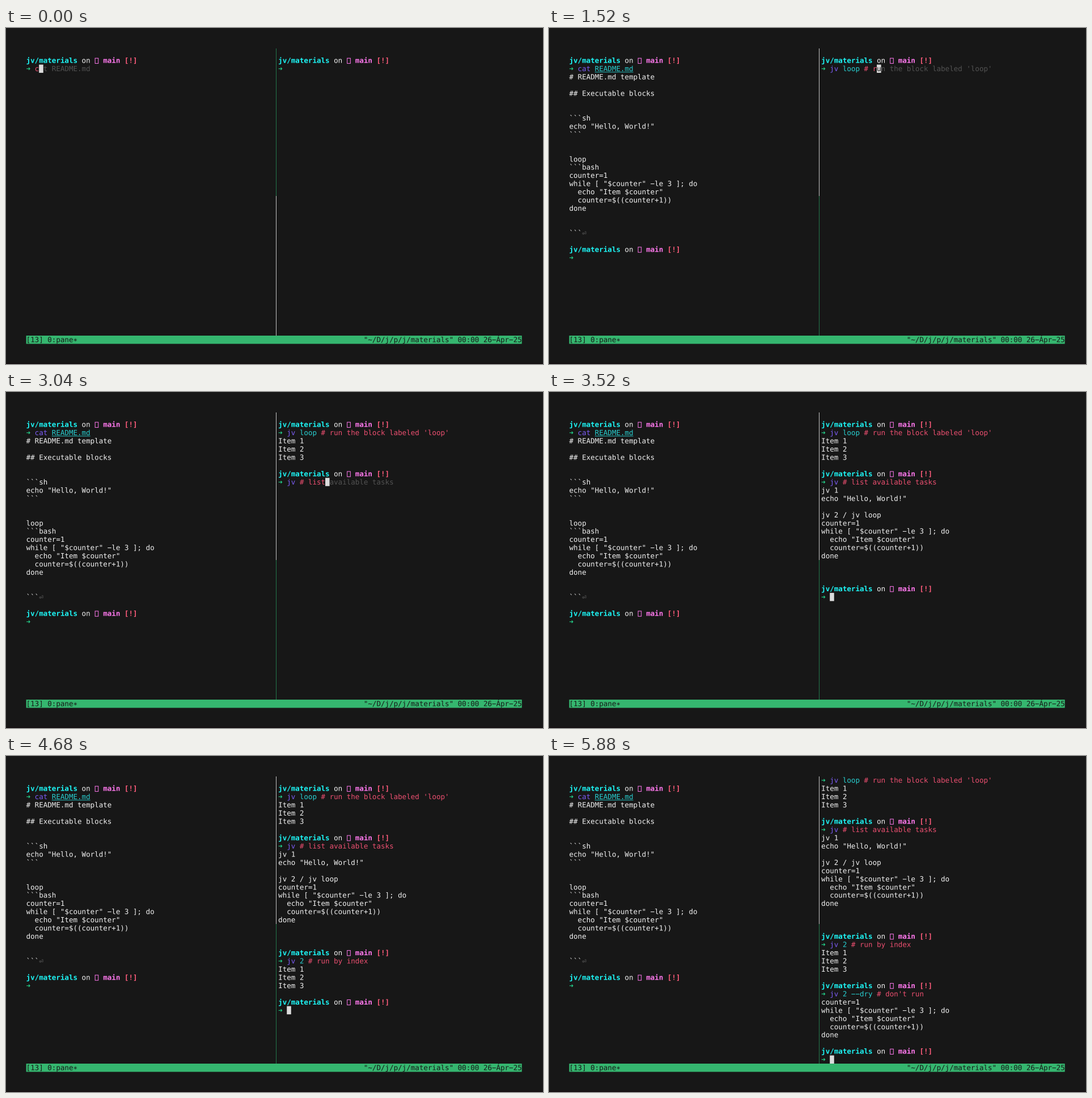
Write an HTML page with a canvas that moves like this. It is 947 by 592 pixels and loops after 7480 ms.

```html
<!DOCTYPE html>
<html lang="en">
<head>
<meta charset="utf-8">
<title>Terminal session</title>
<style>
  html, body { margin: 0; width: 100%; height: 100%; overflow: hidden; background: #171717; }
  canvas { display: block; width: 947px; height: 592px; }
</style>
</head>
<body>
<canvas id="stage" width="1894" height="1184"></canvas>
<script>
const ctx = document.getElementById('stage').getContext('2d');
const LOOP = 7480, COLS = 116, ROWS = 35, SPLIT = 59;
const X0 = 35.6, Y0 = 35.55, CELL_W = 7.535, CELL_H = 14.47;
const FONT = '12.52px "DejaVu Sans Mono", Menlo, monospace';
const BG = '#171717', TEXT = '#f2f2f2', CYAN = '#1df6f6', ARG = '#28cfd0', PINK = '#ff78ee',
  RED = '#ff5c7c', NOTE = '#ec4f70', GREEN = '#24d18a', VIOLET = '#7c5cf5', GHOST = '#525252',
  BLOCK = '#dcdcdc', BAR = '#35b66f', LINE = '#c4c4c4', LINE_ON = '#24774b';
const PWD = '~/D/j/p/j/materials';

const span = (text, color = TEXT, style = {}) => ({ text, color, ...style });
const bold = { bold: true };
const plain = block => block.split('\n').map(s => [span(s)]);
const PROMPT = [span('jv/materials', CYAN, bold), span(' on '), span('▯', PINK),
  span(' main ', PINK, bold), span('[!]', RED, bold)];
const ARROW = span('➜ ', GREEN, bold);

const SCRIPT = `counter=1
while [ "$counter" -le 3 ]; do
  echo "Item $counter"
  counter=$((counter+1))
done`;
const HELLO = 'echo "Hello, World!"';
const ITEMS = 'Item 1\nItem 2\nItem 3';
const README = plain(`# README.md template

## Executable blocks


\`\`\`sh
${HELLO}
\`\`\`


loop
\`\`\`bash
${SCRIPT}


\`\`\``);
README[README.length - 1].push(span('⏎', '#777'));

const leftJobs = [{ at: 0, done: 280, cmd: 'cat README.md', out: README }];
const rightJobs = [
  { at: 1320, done: 2200, cmd: "jv loop # run the block labeled 'loop'", out: plain(ITEMS), quick: true },
  { at: 2880, done: 3520, cmd: 'jv # list available tasks',
    out: plain(`jv 1\n${HELLO}\n\njv 2 / jv loop\n${SCRIPT}\n\n`) },
  { at: 4160, done: 4680, cmd: 'jv 2 # run by index', out: plain(ITEMS) },
  { at: 5320, done: 5880, cmd: "jv 2 --dry # don't run", out: plain(SCRIPT) }
];

// Shell syntax colours for a partly typed command.
function paint(cmd) {
  const [, name, args, note] = cmd.match(/^(\S*)([^#]*)(.*)$/);
  const known = name === 'cat' || name === 'jv';
  const spans = [span(name, known ? VIOLET : NOTE)];
  for (const part of args.split(/(\s+)/))
    spans.push(span(part, ARG, { underline: name === 'cat' && part.trim() !== '' }));
  return [...spans, span(note, NOTE)];
}

// Screen contents of one pane at time t.
function shell(t, jobs) {
  const lines = [[], PROMPT];
  for (const [i, job] of jobs.entries()) {
    if (t < job.at) break;
    if (t < job.done) {
      const count = 1 + 2 * Math.floor((t - job.at) / 40);
      const typed = job.cmd.slice(0, count);
      const past = jobs.slice(0, i).reverse().concat(job);
      const ghost = past.find(p => p.cmd.startsWith(typed)).cmd.slice(typed.length);
      const entered = count > job.cmd.length && !job.quick;
      lines.push([ARROW, ...paint(typed), span(entered ? '' : ghost, GHOST)]);
      return entered
        ? { lines, row: lines.length, col: 0, under: '', title: `${job.cmd.slice(0, 20)} ${PWD}`.slice(0, 21) }
        : { lines, row: lines.length - 1, col: 2 + typed.length, under: jobs === leftJobs ? '' : ghost[0] || '' };
    }
    lines.push([ARROW, ...paint(job.cmd)], ...job.out, [], PROMPT);
  }
  lines.push([ARROW]);
  return { lines, row: lines.length - 1, col: 2, under: '' };
}

function fill(color, x, y, w, h) {
  ctx.fillStyle = color;
  ctx.fillRect(x, y, w, h);
}

// Draws text on the character grid and returns the next column.
function write({ text, color, bold, underline }, col, row) {
  ctx.font = (bold ? 'bold ' : '') + FONT;
  const y = Y0 + row * CELL_H;
  for (const ch of text) {
    const x = X0 + col++ * CELL_W;
    ctx.fillStyle = ctx.strokeStyle = color;
    if (ch === '▯') ctx.strokeRect(x + 1, y + 3.2, 5.6, 9.2);
    else ctx.fillText(ch === '-' ? '−' : ch, x, y + 11.6);
    if (underline) fill(color, x, y + 12.8, CELL_W, 0.9);
  }
  return col;
}

function drawPane(pane, left, focused) {
  const scroll = Math.max(0, pane.lines.length - ROWS);
  pane.lines.slice(scroll).forEach((line, row) =>
    line.reduce((col, part) => write(part, col, row), left));
  if (!focused) return;
  const col = left + pane.col, row = pane.row - scroll;
  fill(BLOCK, X0 + col * CELL_W, Y0 + row * CELL_H, CELL_W, CELL_H);
  write(span(pane.under, BG), col, row);
}

function draw(t) {
  const onLeft = t < 960;
  const left = shell(t, leftJobs), right = shell(t, rightJobs);
  fill(BG, 0, 0, 947, 592);
  fill('#140f11', 0, 590, 947, 2);
  fill(onLeft ? LINE_ON : LINE, 476, 36, 1, 260);
  fill(onLeft ? LINE : LINE_ON, 476, 296, 1, 246);
  drawPane(left, 0, onLeft);
  drawPane(right, SPLIT, !onLeft);
  fill(BAR, X0, Y0 + ROWS * CELL_H, COLS * CELL_W, CELL_H);
  write(span('[13] 0:pane∗', BG), 0, ROWS);
  const status = `"${right.title || PWD}" 00:00 26-Ápr-25`;
  write(span(status, BG), COLS - status.length, ROWS);
}

ctx.scale(2, 2);
ctx.textRendering = 'geometricPrecision';
const start = performance.now();
function tick() {
  draw((performance.now() - start) % LOOP);
  requestAnimationFrame(tick);
}
tick();
</script>
</body>
</html>
```
